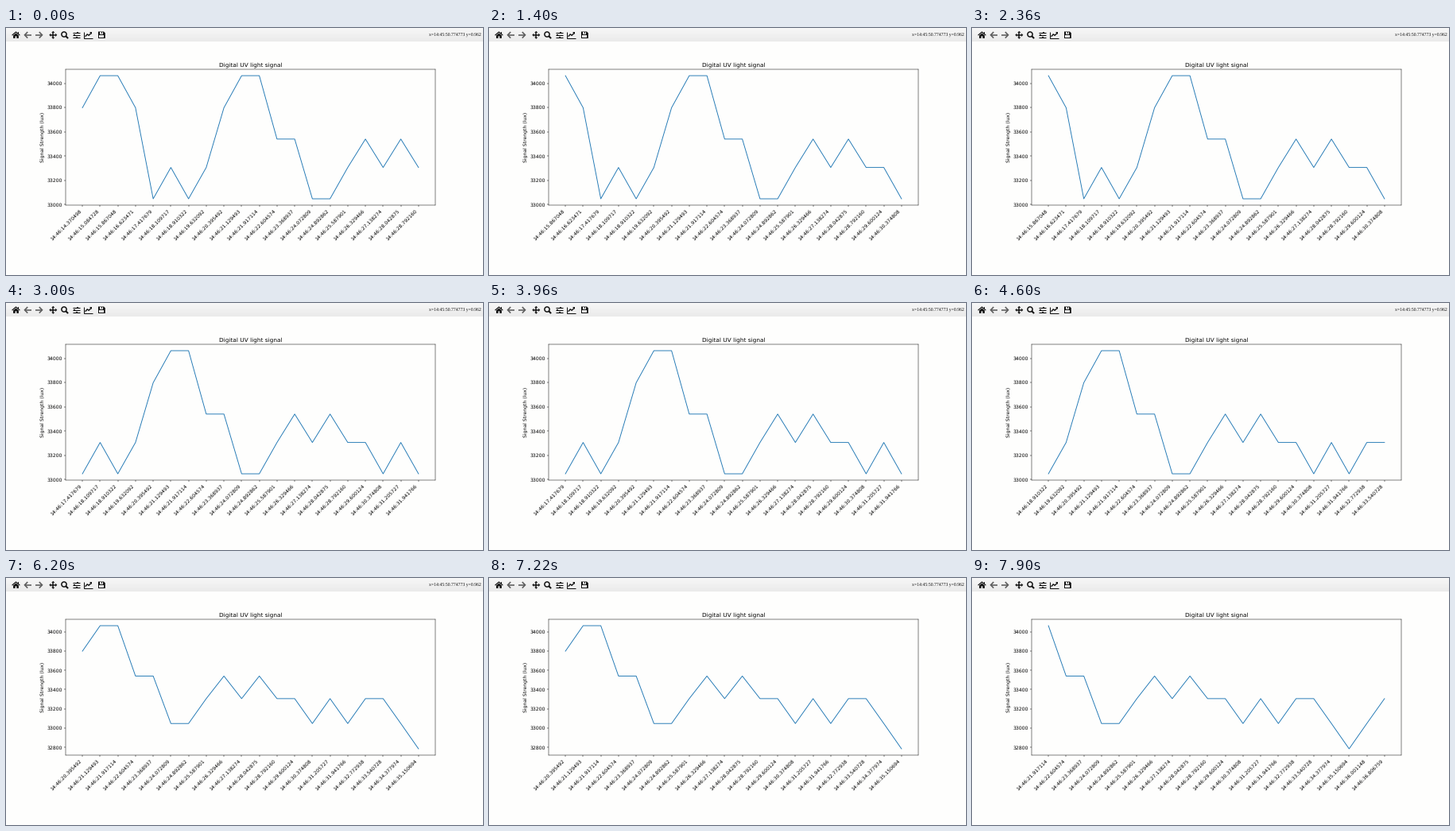
These frames come from a looping animation (600x311 px, 8 s). A matplotlib script:

```python
import numpy as np
import matplotlib as mpl
import matplotlib.pyplot as plt
from matplotlib.animation import FuncAnimation
from matplotlib.patches import Circle, Polygon, Rectangle

W, H, BAR = 600, 311, 17
DPI = 100
SCALE = 4 / 9          # the plot window is shown at 4/9 of its full size
PX = 72 / DPI          # points per pixel
PAPER, INK, DIM = "#fefefd", "#111111", "#5c5c5c"

mpl.rcParams["font.family"] = "DejaVu Sans"
mpl.rcParams["text.hinting"] = "none"
for key in ("font.size", "lines.linewidth", "axes.linewidth",
            "axes.titlepad", "axes.labelpad",
            "xtick.major.size", "xtick.major.pad", "xtick.major.width",
            "ytick.major.size", "ytick.major.pad", "ytick.major.width"):
    mpl.rcParams[key] *= SCALE

# Sensor readings: seconds after 14:46 and quantised light level
SECONDS = [14.370498, 15.084728, 15.867048, 16.623471, 17.417679, 18.109717,
           18.910322, 19.632092, 20.395492, 21.129493, 21.917114, 22.604574,
           23.368937, 24.072809, 24.892862, 25.587901, 26.329466, 27.138274,
           28.042875, 28.792160, 29.600124, 30.374808, 31.205727, 31.941766,
           32.772938, 33.540728, 34.377974, 35.150694, 36.001148, 36.806759]
LEVELS = np.array([32786, 33048, 33306, 33540, 33798, 34062])
LUX = LEVELS[[int(c) for c in "455412124553311232322121221012"]]
LABELS = [f"14:46:{s:09.6f}" for s in SECONDS]

WINDOW, SHIFT = 20, 2
INTERVAL, FRAMES = 100, 80
REFRESH = [1400, 3000, 4600, 6200, 7900]

fig = plt.figure(figsize=(W / DPI, H / DPI), dpi=DPI, facecolor=PAPER)

# ---- toolbar, in pixel coordinates ----
bar = fig.add_axes([0, 1 - BAR / H, 1, BAR / H])
bar.set(xlim=(0, W), ylim=(BAR, 0))
bar.axis("off")
shade = np.linspace(0.965, 0.915, BAR)[:, None]
bar.imshow(shade, extent=(0, W, BAR, 0), cmap="gray", vmin=0, vmax=1,
           aspect="auto", interpolation="nearest")
bar.plot([0, W], [16.5, 16.5], color="#d2d2d2", lw=PX)


def stroke(points, width, color=INK):
    x, y = zip(*points)
    bar.plot(x, y, color=color, lw=width * PX,
             solid_capstyle="butt", solid_joinstyle="miter")


def fill(points, color=INK):
    bar.add_patch(Polygon(points, closed=True, fc=color, ec="none"))


def box(x, y, w, h, color=INK):
    bar.add_patch(Rectangle((x, y), w, h, fc=color, ec="none"))


def home():
    stroke([(7.6, 9.2), (12.5, 5), (17.4, 9.2)], 1.2)
    box(14.8, 5.2, 1.3, 2.5)
    fill([(9.1, 9.4), (12.5, 6.6), (15.9, 9.4), (15.9, 12.9), (13.4, 12.9),
          (13.4, 10.3), (11.6, 10.3), (11.6, 12.9), (9.1, 12.9)])


def arrow(cx, way):
    cy, tip = 8.8, cx + 4.2 * way
    stroke([(cx - 4.3 * way, cy), (tip - 0.5 * way, cy)], 1.6, DIM)
    stroke([(cx + 0.2 * way, cy - 3.8), (tip - 0.3 * way, cy),
            (cx + 0.2 * way, cy + 3.8)], 1.6, DIM)


def move(cx, cy):
    for dx, dy in ((1, 0), (-1, 0), (0, 1), (0, -1)):
        stroke([(cx, cy), (cx + 3.6 * dx, cy + 3.6 * dy)], 1.5)
        fill([(cx + 5 * dx, cy + 5 * dy),
              (cx + 2.9 * dx + 2.1 * dy, cy + 2.9 * dy + 2.1 * dx),
              (cx + 2.9 * dx - 2.1 * dy, cy + 2.9 * dy - 2.1 * dx)])


def zoom():
    bar.add_patch(Circle((73, 8), 3.1, fc="none", ec=INK, lw=1.5 * PX))
    stroke([(75.1, 10.1), (78.1, 13.1)], 2)


def sliders():
    for y, knob in ((5.8, 89.7), (8.9, 85.8), (12, 88.6)):
        stroke([(83.9, y), (93.1, y)], 1.1)
        box(knob - 0.9, y - 1.3, 1.9, 2.6)


def chart():
    stroke([(98.2, 4.6), (98.2, 12.7), (108.6, 12.7)], 1)
    stroke([(99.6, 10.7), (102.4, 7.8), (104.1, 9.4), (106.9, 6.5)], 1.4)
    fill([(105, 5.2), (108.2, 5.2), (108.2, 8.4)])


def save():
    fill([(116, 4.5), (123, 4.5), (124.8, 6.3), (124.8, 13), (116, 13)])
    paper = "#f1f1f1"
    box(117.8, 5.2, 4.4, 2.4, paper)
    box(120.3, 5.2, 1.1, 1.9)
    box(117.4, 9.2, 6, 3, paper)


home()
arrow(27.4, -1)
arrow(41.6, 1)
move(59.3, 8.8)
zoom()
sliders()
chart()
save()
cursor = bar.text(598, 10.6, "x=14:45:50.774773 y=0.962", ha="right",
                  va="baseline", family="Liberation Serif", size=4.12,
                  color=INK)

# ---- plot ----
view = (H - BAR) / H
ax = fig.add_axes([0.125, 0.30 * view, 0.775, 0.58 * view], facecolor=PAPER)
slots = np.arange(WINDOW)
line, = ax.plot(slots, LUX[:WINDOW], color="#1f77b4")
ax.set_title("Digital UV light signal")
ax.set_ylabel("Signal Strength (lux)")


def update(i):
    step = int(np.searchsorted(REFRESH, i * INTERVAL, side="right"))
    part = slice(step * SHIFT, step * SHIFT + WINDOW)
    line.set_ydata(LUX[part])
    ax.set_xticks(slots, LABELS[part], rotation=45, ha="right")
    ax.relim()
    ax.autoscale_view()
    cursor.set_visible(step < len(REFRESH))
    return line, cursor


anim = FuncAnimation(fig, update, frames=FRAMES, interval=INTERVAL,
                     repeat=True, repeat_delay=0, blit=False)
plt.show()
```
